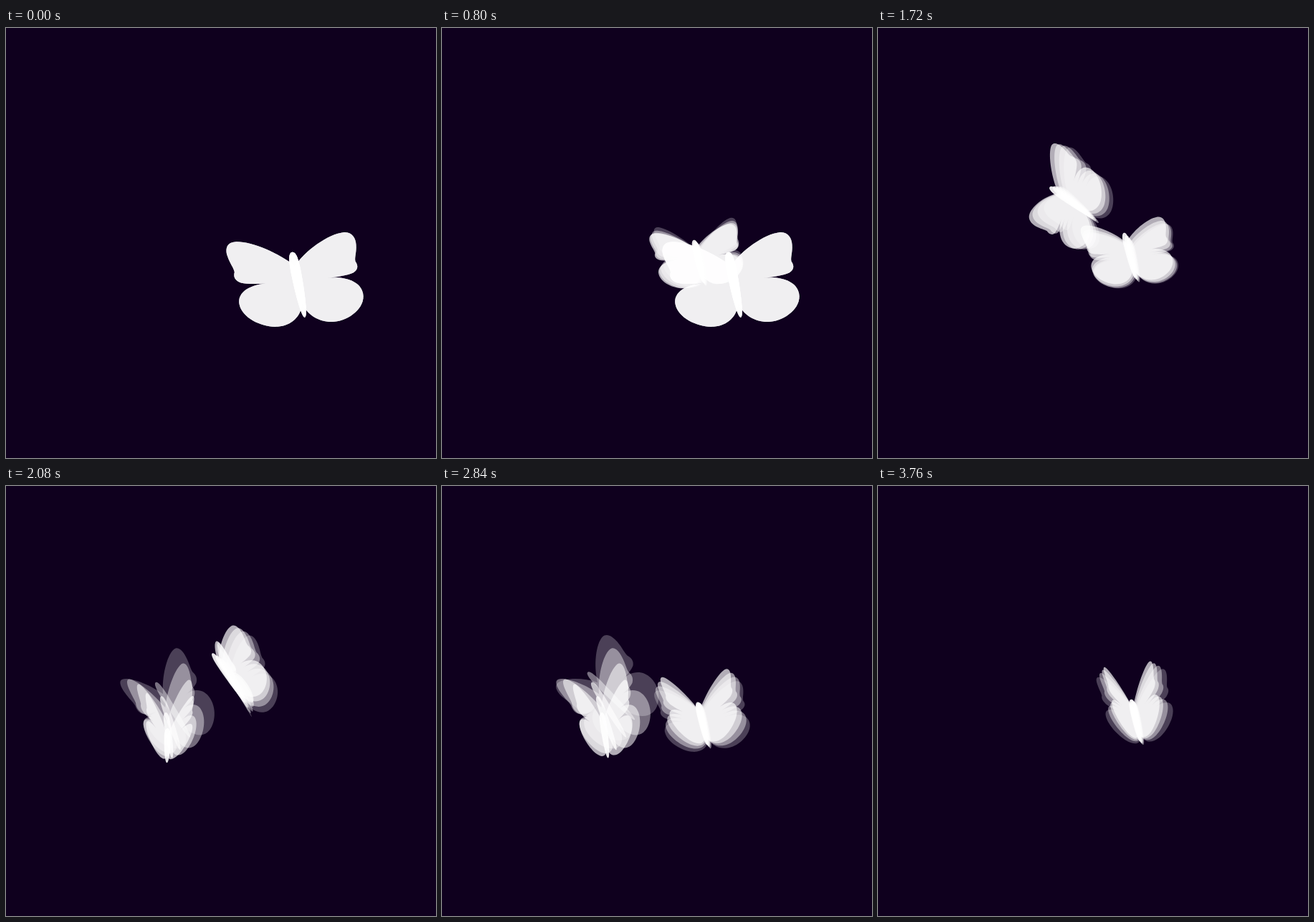
Write an HTML page with a canvas that moves like this. It is 600 by 600 pixels and loops after 3800 ms.

```html
<!DOCTYPE html>
<html lang="en">
<head>
<meta charset="utf-8">
<title>Butterflies</title>
<style>
  html, body { margin: 0; width: 100%; height: 100%; overflow: hidden; background: #0f001e; }
  canvas { display: block; }
</style>
</head>
<body>
<canvas id="stage" width="600" height="600"></canvas>
<script>
const LOOP = 3800, STEP = 40, DELAY = 800, LIFE = 3000, FLIGHT = 2200;
const FLAP = 860, MAX_FOLD = 58, LENGTH = 1.45;
const ECHOES = [0.68, 0.55, 0.42, 0.25];   // newest first
const ctx = document.getElementById('stage').getContext('2d');
const rad = degrees => degrees * Math.PI / 180;

// One wing, hinged on the body axis, and the body.
const WING = new Path2D('M0-27C18-48 55-69 76-69.5C88-70 92-60 90.5-50C89-38 85-33 85-26' +
  'C88-20 87-14 79-10C71-7 55-6 40-5.5C66-7 87 3 87 21C87 42 60 58 40 58C20 58 5 46 0 28Z');
const BODY = new Path2D('M0-47.5C5-47.5 7-38 7-20C7 5 5 48 0 48C-5 48-7 5-7-20C-7-38-5-47.5 0-47.5Z');

// Key points of the flight: time, x, y, scale, heading, pitch, roll.
const PATH = [
  [0, 408, 358, 1, 11, 48, 8],
  [400, 373, 339, 0.74, 14, 48, 10],
  [920, 351, 317, 0.66, 14, 45, 10],
  [1280, 309, 265, 0.56, 34, -10, 52],
  [1720, 268, 242, 0.68, 55, -42, 25],
  [1800, 248, 242, 0.7, 75, -50, 18],
  [2080, 225, 362, 0.64, -1, 57, 3],
  [FLIGHT, 226, 370, 0.62, -4, 60, 0]
];

// Smooth curve through the key points, at rest at both ends.
function flightAt(time) {
  const i = PATH.findIndex((key, k) => k > 0 && time <= key[0]);
  const a = PATH[i - 1], b = PATH[i], span = b[0] - a[0], s = (time - a[0]) / span;
  const slope = (k, n) => {
    const p = PATH[k - 1], q = PATH[k + 1];
    return p && q ? (q[n] - p[n]) / (q[0] - p[0]) * span : 0;
  };
  return a.map((v, n) => {
    const m0 = slope(i - 1, n), m1 = slope(i, n), d = b[n] - v;
    return v + s * (m0 + s * (3 * d - 2 * m0 - m1 + s * (m0 + m1 - 2 * d)));
  });
}

function fillShape(shape, ux, uy, vy) {
  ctx.save();
  ctx.transform(ux, uy, 0, vy, 0, 0);
  ctx.fill(shape);
  ctx.restore();
}

function drawPose(age, alpha) {
  const [, x, y, scale, heading, pitch, roll] = flightAt(age % FLIGHT);
  const fold = MAX_FOLD * (1 - Math.cos(2 * Math.PI * age / FLAP)) / 2;
  const length = LENGTH * Math.cos(rad(pitch));
  ctx.setTransform(scale, 0, 0, scale, x, y);
  ctx.rotate(-rad(heading));
  ctx.globalAlpha = alpha;
  for (const side of [-1, 1]) {
    const lift = rad(fold - side * roll);
    fillShape(WING, side * Math.cos(lift), -Math.sin(rad(pitch)) * Math.sin(lift), length);
  }
  ctx.globalAlpha = 1 - (1 - alpha) ** 2;
  fillShape(BODY, 1, 0, length);
}

function drawButterfly(age) {
  if (age < 0 || age >= LIFE) return;
  const start = age < FLIGHT ? 0 : FLIGHT;
  for (let i = ECHOES.length - 1; i >= 0; i--) {
    drawPose(Math.max(age - i * STEP, start), ECHOES[i]);
  }
}

function render(now) {
  const time = Math.floor((now % LOOP) / STEP) * STEP;
  ctx.setTransform(1, 0, 0, 1, 0, 0);
  ctx.globalAlpha = 1;
  ctx.fillStyle = '#0f001e';
  ctx.fillRect(0, 0, 600, 600);
  ctx.fillStyle = '#fff';
  drawButterfly(time - DELAY);
  drawButterfly(time);
  requestAnimationFrame(render);
}
requestAnimationFrame(render);
</script>
</body>
</html>
```
